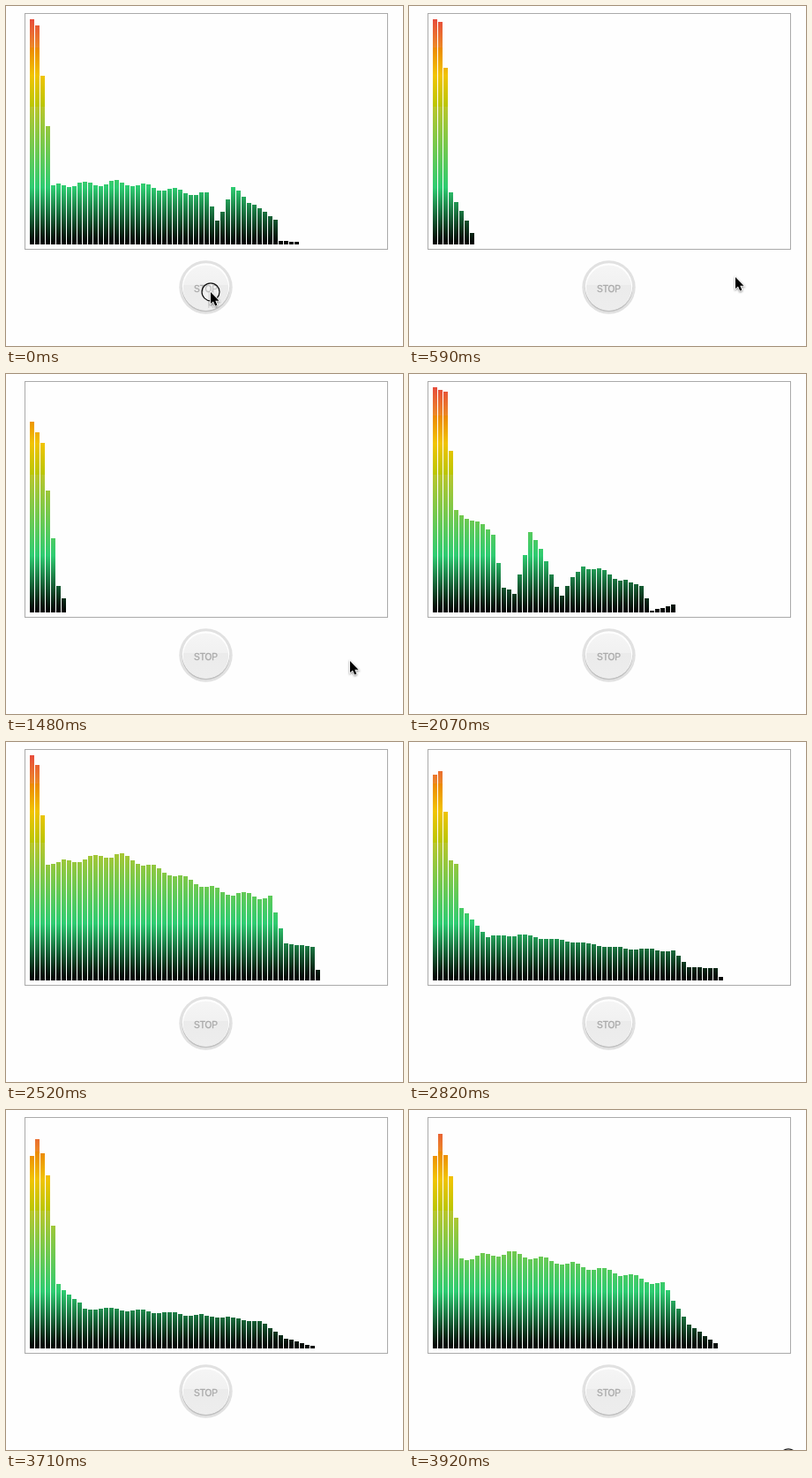
These frames come from a looping animation (450 px wide and 385 px high, 4020 ms). An HTML page:

```html
<!DOCTYPE html>
<html lang="en">
<head>
<meta charset="utf-8">
<title>Spectrum</title>
<style>
  html, body { margin: 0; width: 100%; height: 100%; overflow: hidden; background: #fefefe; }
  svg { display: block; }
  text { font: 10px "Liberation Sans", Arial, sans-serif; text-anchor: middle; }
  #arrow { filter: drop-shadow(0 1px 1px #0007); }
</style>
</head>
<body>
<svg width="450" height="385" viewBox="0 0 450 385">
  <defs>
    <linearGradient id="level" gradientUnits="userSpaceOnUse" x1="0" y1="15" x2="0" y2="269">
      <stop offset="0" stop-color="#e74c3c"/>
      <stop offset=".125" stop-color="#ec8826"/>
      <stop offset=".125" stop-color="#ec8800"/>
      <stop offset=".25" stop-color="#f1c400"/>
      <stop offset=".39" stop-color="#b9c600"/>
      <stop offset=".39" stop-color="#b9c62b"/>
      <stop offset=".75" stop-color="#2ecc71"/>
      <stop offset="1" stop-color="#000"/>
    </linearGradient>
    <linearGradient id="face" x1="0" y1="0" x2="0" y2="1">
      <stop offset="0" stop-color="#f5f5f5"/>
      <stop offset=".44" stop-color="#f1f1f1"/>
      <stop offset=".44" stop-color="#ebebeb"/>
      <stop offset="1" stop-color="#ededed"/>
    </linearGradient>
  </defs>
  <rect x="21.5" y="8.5" width="411" height="267" fill="#fefefe" stroke="#aaa"/>
  <g id="bars" fill="url(#level)" shape-rendering="crispEdges"></g>
  <circle cx="226.5" cy="318.5" r="30.2" fill="#e1e1e1"/>
  <circle cx="226.5" cy="319.5" r="26.8" fill="#c0c0c0"/>
  <circle cx="226.5" cy="317.9" r="26.7" fill="#fff"/>
  <circle cx="226.5" cy="319.1" r="25.7" fill="url(#face)"/>
  <text x="226.5" y="324" fill="#a8a8a8" stroke="#a8a8a8" stroke-width=".3">STOP</text>
  <text id="ghost" x="235" y="342" fill="#ccc">RT</text>
  <circle id="ring" r="10" fill="#fff" fill-opacity=".25" stroke="#111" stroke-width="1.2"/>
  <path id="arrow" d="M1 1V14L4 11.5L6.2 16.4L8.4 15.4L6.3 10.7H10.5Z" fill="#000" stroke="#fff" stroke-width="1.6" paint-order="stroke"/>
</svg>
<script>
const LOOP = 4020, STEP = 148.2, LAST = 26, LAST_START = 3920;
const BASE = 270, COUNT = 55;
const $ = id => document.getElementById(id);

// Piecewise linear curve through [x, y] points.
function curve(points, x) {
  const i = Math.max(0, points.findLastIndex(p => p[0] <= x));
  const [x0, y0] = points[i], [x1, y1] = points[i + 1] || points[i];
  return x1 === x0 ? y0 : y0 + (y1 - y0) * (x - x0) / (x1 - x0);
}

// A spectrum outline from a few [bar, top] points, with a light ripple after the bass.
function pose(step, ...points) {
  const end = points.at(-1)[0];
  const tops = Array.from({ length: COUNT }, (_, i) => {
    if (i > end) return BASE;
    const ripple = end > 20 && i > 4 && i < end - 8 ? 3 * Math.sin(i * 1.1 + step) : 0;
    return curve(points, i) + ripple;
  });
  return { step, tops };
}

const poses = [
  pose(0, [0, 15], [1, 22], [3, 136], [4, 203], [17, 200], [33, 214], [35, 241], [38, 207], [46, 242], [47, 266], [50, 267]),
  pose(4, [0, 15], [1, 18], [2, 70], [3, 211], [6, 243], [8, 270]),
  pose(10, [0, 54], [2, 78], [5, 240], [6, 254]),
  pose(14, [0, 15], [2, 20], [4, 154], [11, 180], [13, 242], [15, 251], [18, 177], [24, 250], [28, 216], [39, 240], [41, 268], [45, 261]),
  pose(17, [0, 15], [1, 26], [3, 139], [16, 127], [23, 142], [36, 170], [45, 176], [48, 228], [53, 232], [54, 258]),
  pose(22, [0, 50], [2, 25], [3, 59], [5, 218], [9, 259]),
  pose(26, [0, 52], [1, 27], [3, 75], [5, 168], [14, 162], [36, 186], [43, 198], [48, 243], [53, 264])
];

const pathX = [[0, 231], [4, 369], [8, 369], [9, 373], [10, 389], [12, 429]];
const pathY = [[0, 323], [4, 306], [8, 306], [9, 309], [10, 324], [12, 393]];

const bars = Array.from({ length: COUNT }, (_, i) => {
  const bar = document.createElementNS("http://www.w3.org/2000/svg", "rect");
  bar.setAttribute("x", 27 + i * 6);
  bar.setAttribute("width", 5);
  return $("bars").appendChild(bar);
});

// Levels rise late and sharply, and fall away quickly.
function blend(from, to, k) {
  const ease = to < from ? k ** 3 : 1 - (1 - k) ** 2;
  return Math.round(from + (to - from) * ease);
}

function draw(step) {
  const n = poses.findLastIndex(p => p.step <= step);
  const a = poses[n], b = poses[n + 1] || a;
  const k = a === b ? 0 : (step - a.step) / (b.step - a.step);
  bars.forEach((bar, i) => {
    const top = blend(a.tops[i], b.tops[i], k);
    bar.setAttribute("y", top);
    bar.setAttribute("height", BASE - top);
  });

  const x = curve(pathX, step), y = curve(pathY, step);
  $("arrow").setAttribute("transform", `translate(${x} ${y})`);
  $("ring").setAttribute("transform", `translate(${x + 1} ${y + 0.8})`);
  $("ring").style.display = step % LAST ? "none" : "";
  $("ghost").style.display = step ? "none" : "";
}

let shown = -1;
function tick() {
  const t = performance.now() % LOOP;
  const step = t >= LAST_START ? LAST : Math.min(LAST - 1, Math.floor((t + 5) / STEP));
  if (step !== shown) draw(shown = step);
  requestAnimationFrame(tick);
}
tick();
</script>
</body>
</html>
```
